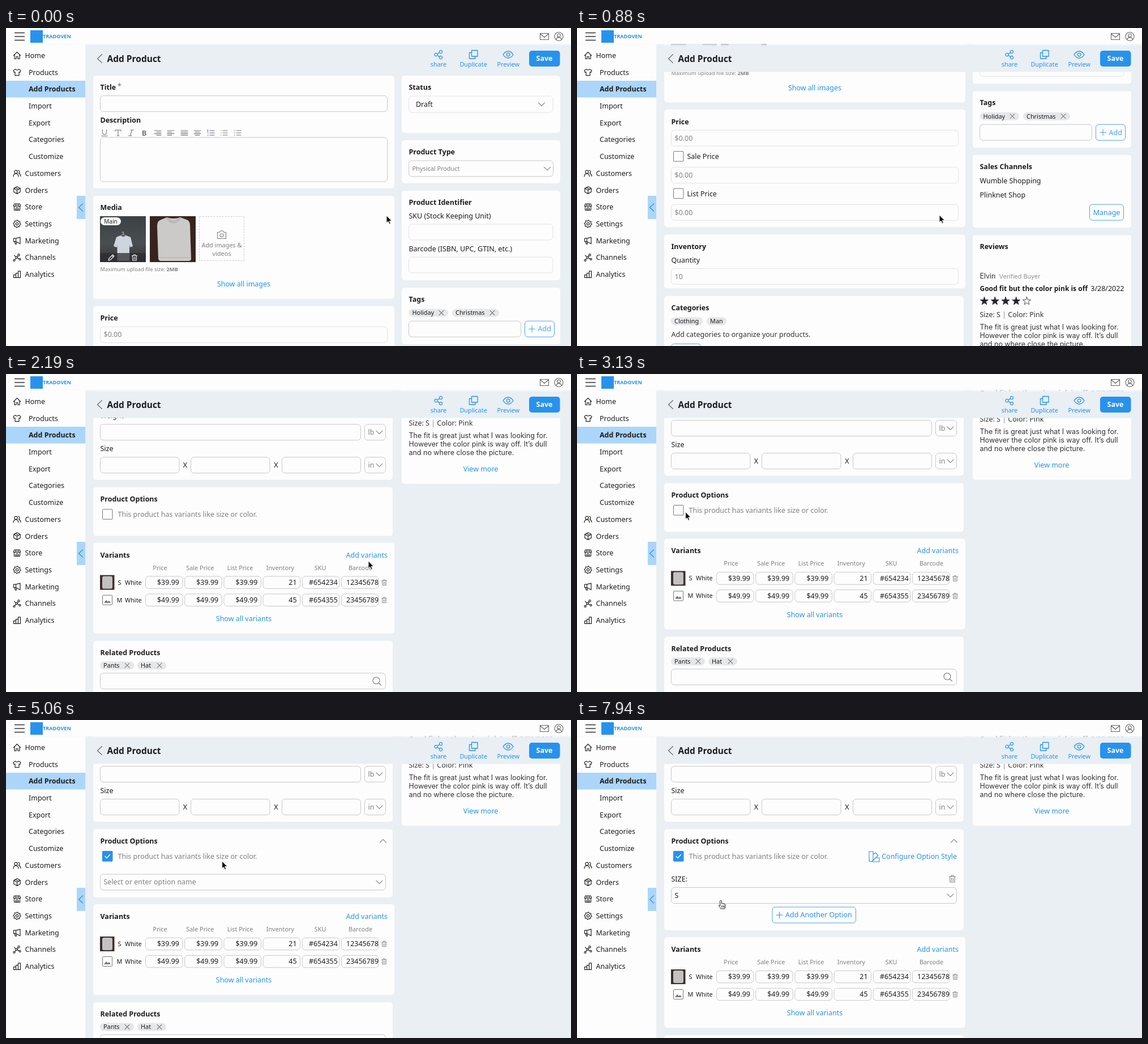
Animation, 998 px wide and 561 px high, one loop 8000 ms. Source, as an HTML page:

```html
<!DOCTYPE html>
<html lang="en">
<head>
<meta charset="utf-8">
<title>Add Product</title>
<style>
html, body { margin: 0; width: 100%; height: 100%; overflow: hidden; background: #e9eff3; }
svg { display: block; width: 100%; height: 100%; font-family: "Noto Sans", sans-serif; }
</style>
</head>
<body>
<svg id="stage" viewBox="0 0 998 561"></svg>
<script>
const BLUE = '#2792ee', SKY = '#4ba4f1', INK = '#1c1c1c', GRAY = '#808080', LINE = '#c8c8cc', FAINT = '#e2e2e5';
const CARD = '#fdfdfd', BG = '#e9eff3', PALE = '#abd6fa';
const BODY = 12.47, SMALL = 10.9, TINY = 9.35;
const stage = document.getElementById('stage');

// Drawing helpers; text y is the middle of the capitals
const text = (x, y, str, { size = BODY, fill = INK, bold, anchor = 'start', font } = {}) =>
  `<text x="${x}" y="${y + size * 0.36}" font-size="${size}" fill="${fill}" text-anchor="${anchor}"` +
  `${bold ? ' font-weight="600"' : ''}${font ? ` font-family="${font}"` : ''}>${str}</text>`;
const bold = (x, y, str) => text(x, y, str, { bold: true });
const link = (x, y, str, anchor = 'middle', fill = BLUE) => text(x, y, str, { fill, anchor });
const rect = (x, y, w, h, fill, r = 0, stroke = 'none') =>
  `<rect x="${x}" y="${y}" width="${w}" height="${h}" rx="${r}" fill="${fill}" stroke="${stroke}"/>`;
const path = (x, y, d, stroke = GRAY, width = 1.1, fill = 'none') =>
  `<path transform="translate(${x} ${y})" d="${d}" stroke="${stroke}" stroke-width="${width}" fill="${fill}" stroke-linecap="round" stroke-linejoin="round"/>`;
const group = (dy, body, id = '') => `<g ${id && `id="${id}"`} transform="translate(0 ${dy})">${body}</g>`;
const ring = (r, x = 0, y = 0) => `M${x - r} ${y}a${r} ${r} 0 1 0 ${2 * r} 0a${r} ${r} 0 1 0 ${-2 * r} 0`;

const card = (y1, y2, right = 686) => rect(154, y1, right - 154, y2 - y1, CARD, 5);
const sideCard = (y1, y2) => rect(699, y1, 280, y2 - y1, CARD, 5);
const field = (x1, x2, y, h = 28, stroke = LINE) => rect(x1 + .5, y - h / 2, x2 - x1 - 1, h, CARD, 5.5, stroke);
const down = (x, y) => path(x, y, 'M-5.5 -2.7L0 2.8L5.5 -2.7');
const cross = (x, y) => path(x, y, 'M-4 -4L4 4M4 -4L-4 4');
const search = (x, y) => path(x, y, ring(6, -1, -1) + 'M3.5 3.5L7.5 7.5', GRAY, 1.2);
const trash = (x, y, k = 1, color = GRAY) =>
  `<g transform="translate(${x} ${y}) scale(${k})">${path(0, 0, 'M-5.5 -3.8H5.5M-2 -4V-6H2V-4M-4.3 -3.5L-4 6H4L4.3 -3.5M-1.4 -1V3.8M1.4 -1V3.8', color)}</g>`;
const chip = (x, w, y, str, closable) =>
  rect(x, y - 7, w, 14, '#e6e7e9', 7) + text(x + 6, y, str, { size: SMALL }) + (closable ? cross(x + w - 12, y) : '');
const outline = (x, y, w) => rect(x + .5, y - 14, w - 1, 28, CARD, 5, SKY);
const plus = (x, y, color) => path(x, y, 'M-5.5 0H5.5M0 -5.5V5.5', color);
const addButton = (x, y) => outline(x, y, 53) + plus(x + 13, y, SKY) + link(x + 23.5, y, 'Add', 'start', SKY);
const checkbox = y => rect(170.5, y - 9, 17.5, 17.5, CARD, 1, '#777');
const money = (y, str = '$0.00') => field(166, 674, y, 28, FAINT) + text(172.5, y, str, { fill: GRAY });

const star = (x, y, solid) => {
  let d = '';
  for (let i = 0; i < 10; i++) {
    const r = i % 2 ? 3 : 7.4, a = (i / 5 - .5) * Math.PI;
    d += (i ? 'L' : 'M') + (r * Math.cos(a)).toFixed(2) + ' ' + (r * Math.sin(a)).toFixed(2);
  }
  return path(x, y, d + 'Z', '#25252d', .8, solid ? '#25252d' : 'none');
};
const gear = () => {
  let d = ring(2.2);
  for (let i = 0; i <= 32; i++) {
    const r = i % 4 < 2 ? 6.4 : 5.1, a = i * Math.PI / 16;
    d += (i ? 'L' : 'M') + (r * Math.cos(a)).toFixed(2) + ' ' + (r * Math.sin(a)).toFixed(2);
  }
  return d;
};

const icons = {
  Home: 'M-6 0L0 -6L6 0M-4.5 -1V6H-1.5V2H1.5V6H4.5V-1',
  Products: 'M-3 -5.5L-6.5 -3.5L-5.5 0L-3.5 -.5V5.5H3.5V-.5L5.5 0L6.5 -3.5L3 -5.5Q0 -2.5 -3 -5.5',
  Customers: ring(2.7, -2, -2.6) + 'M-6.5 5.5Q-6 .5 -2 .5Q2 .5 2.5 5.5M2 -5.4a2.7 2.7 0 0 1 1 5.1Q6 1 6.5 5',
  Orders: 'M0 -6.3L5.7 -3.2V3.2L0 6.3L-5.7 3.2V-3.2ZM-5.7 -3.2L0 0L5.7 -3.2M0 0V6M-2.8 -4.7L2.8 -1.6',
  Store: 'M-5 -5.5H5L6 -1.5H-6ZM-5 -1V5.5H5V-1M-2 1.5H2V5H-2ZM-2 -5V-2M2 -5V-2',
  Settings: gear(),
  Marketing: 'M-6 -4V1.5H-2L5.5 5.5V-6L-2 -4ZM-2 -4V1.5M-4.5 1.5L-3.2 6H-1L-2 1.5',
  Channels: ring(1.7, -1, 0) + ring(1.7, 3, -4.5) + ring(1.5, 5, 3) + ring(1.5, -5, 5) + 'M0 -1.4L2 -3.2M.6 .6L3.6 2.4M-2 1.3L-4 4M-5 -4L-2.3 -1',
  Analytics: 'M-6 5.7V1H-2V5.7ZM-2 5.7V-2H2V5.7ZM2 5.7V-5.7H6V5.7Z',
};
const menu = ['Home', 'Products', 'Add Products', 'Import', 'Export', 'Categories', 'Customize',
  'Customers', 'Orders', 'Store', 'Settings', 'Marketing', 'Channels', 'Analytics'];

const sidebar = () => rect(0, 31, 140, 530, CARD) + rect(0, 93, 140, 29.5, PALE) +
  menu.map((name, i) => {
    const y = 48.5 + 29.7 * i;
    return (icons[name] ? path(19.5, y, icons[name], '#222', 1.2) : '') +
      text(i && i < 7 ? 40 : 33.5, y, name, { bold: i === 2 });
  }).join('') +
  rect(125, 296, 15, 41, PALE) + path(132, 316.5, 'M3.5 -6.5L-3.5 0L3.5 6.5', BLUE, 1.2);

// A pale veil leaves only a trace of the page between bar and header
const topBar = () => rect(0, 0, 998, 28.5, CARD) + rect(0, 28.5, 141, 2.5, CARD) +
  rect(140, 28.5, 858, 2.5, 'rgba(241,244,249,.85)') +
  path(24, 15, 'M-8.5 -6.5H8.5M-8.5 0H8.5M-8.5 6.5H8.5', '#333', 1.4) +
  rect(43, 4, 22, 22, BLUE) +
  text(65, 15, 'TRADOVEN', { size: 9.1, fill: BLUE, bold: true }) +
  path(951, 15, 'M-7.5 -5.5H7.5V5.5H-7.5ZM-7.5 -5L0 1.5L7.5 -5', '#666') +
  path(976.5, 15, ring(7.5) + ring(2.8, 0, -2) + 'M-4.8 5.5Q-4 1.6 0 1.6Q4 1.6 4.8 5.5', '#666');

const header = () => rect(140, 31, 858, 46.5, BG) +
  path(165.5, 54, 'M4 -7.5L-4 0L4 7.5', '#666') +
  text(178.5, 54, 'Add Product', { size: 15.5, bold: true }) +
  path(764, 47, ring(2.6, -4.5, 0) + ring(2.6, 4, -5) + ring(2.6, 4, 5) + 'M-2.2 -1.3L1.8 -3.6M-2.2 1.3L1.8 3.6', BLUE, 1.3) +
  path(826, 47, 'M-3.5 -7.5H7V3H-3.5ZM-3.5 -3.5H-7.5V7H3V3', BLUE, 1.3) +
  path(887, 47, 'M-9 0Q-5 -6 0 -6Q5 -6 9 0Q5 6 0 6Q-5 6 -9 0Z' + ring(2.8), BLUE, 1.3) +
  ['share', 'Duplicate', 'Preview'].map((s, i) =>
    text(764 + 61.6 * i, 64, s, { size: SMALL, fill: BLUE, anchor: 'middle' })).join('') +
  rect(924, 40, 54.5, 28, BLUE, 5) +
  text(951, 54, 'Save', { fill: '#fff', bold: true, anchor: 'middle' });

const toolbar = () => {
  const tool = (x, d, color = '#777') => path(x, 185, d, color);
  const list = 'M-2 -4H6M-2 0H6M-2 4H6';
  return tool(174, 'M-3.5 -5.5V-.5Q-3.5 3 0 3Q3.5 3 3.5 -.5V-5.5M-5 5.5H5') +
    tool(198, 'M-5 -3V-5H5V-3M0 -5V5M-2 5H2') +
    tool(221, 'M-1 -5H4.5M1.7 -5L-1.7 5M-4.5 5H1') +
    text(244, 185, 'B', { size: 13, fill: '#777', bold: true, anchor: 'middle' }) +
    tool(268, 'M-6 -4H6M-2 -1.3H6M-6 1.4H6M-2 4.1H6') +
    tool(291, 'M-6 -4H6M-6 -1.3H2M-6 1.4H6M-6 4.1H2') +
    tool(315, 'M-6 -4H6M-6 -1.3H6M-6 1.4H6M-6 4.1H6') +
    tool(338, 'M-6 -4H6M-4 -1.3H4M-6 1.4H6M-4 4.1H4') +
    tool(362, list + 'M-5.5 -5.5V-2.5M-6 0H-4.8M-6 4H-4.8', '#5a5f88') +
    tool(385, list + 'M-5.5 -4h.3M-5.5 0h.3M-5.5 4h.3') +
    tool(409, list + 'M-6 -4h1M-6 0h1M-6 4h1');
};

const photos = () => rect(166, 332, 81, 81, 'url(#slate)') +
  path(207, 367, 'M0 -3q2.5 -3 0 -4.5q-2 0 -2 2M0 -3L7 1M0 -3L-7 1', '#c9c4bc', .9) +
  path(207, 367, 'M-5 -1L-12 2L-17 18L-11 20L-10.5 15V44H11V15L12 20L17 18L13 2L5 -1Q0 3 -5 -1Z', 'none', 0, '#cfd5dc') +
  rect(166, 397, 81, 16, 'rgba(45,45,48,.75)') +
  path(186, 405, 'M-5 5L-4 1.5L2.5 -5L5 -2.5L-1.5 4ZM1 -3.5L3.5 -1', '#fff') + trash(227, 405, .85, '#fff') +
  rect(167, 334, 36, 14, '#fff', 7) + text(185, 341, 'Main', { size: 10, anchor: 'middle' }) +
  rect(254, 332, 81, 81, '#38241f') +
  path(296, 372, 'M-12 -38Q0 -34 12 -38L25 -33Q29 -30 29 -24L31 35Q31 39 26 39H-22Q-27 39 -27 34L-29 -22Q-29 -31 -24 -33Z', 'none', 0, '#cbcac8') +
  path(296, 372, 'M-13 -37Q0 -20 13 -37M-10 -37Q0 -25 10 -37', '#a5a4a3', 1.1) +
  path(296, 372, 'M-25 33H29', '#b2b0ae', 1);

const mainTop = () =>
  card(84, 283) + bold(166.5, 105, 'Title') + text(197, 103, '*', { fill: '#666' }) + field(166, 674, 133.5) +
  bold(166.5, 162.5, 'Description') + toolbar() + field(166, 674, 232, 78) +
  card(296, 478) + bold(166.5, 317, 'Media') + photos() +
  `<rect x="341.5" y="332.5" width="79" height="78" fill="none" stroke="#ccc" stroke-dasharray="3 2"/>` +
  path(381, 365, 'M-7.5 -4.5H-4L-2.5 -7H2.5L4 -4.5H7.5V6.5H-7.5Z' + ring(3, 0, .8)) +
  text(381, 383, 'Add images &amp;', { size: SMALL, fill: GRAY, anchor: 'middle' }) +
  text(381, 398, 'videos', { size: SMALL, fill: GRAY, anchor: 'middle' }) +
  text(166.5, 426, 'Maximum upload file size: <tspan font-weight="600">2MB</tspan>', { size: TINY, fill: GRAY }) +
  link(420, 452, 'Show all images') +
  card(490.5, 698) + bold(166.5, 512, 'Price') + money(541) +
  checkbox(573.5) + text(194.5, 573.5, 'Sale Price') + money(606.5) +
  checkbox(639) + text(194.5, 639, 'List Price') + money(672) +
  card(711, 806) + bold(166.5, 732, 'Inventory') + text(166.5, 756, 'Quantity') + money(785, '10');

const mainMiddle = () =>
  card(120.5, 246, 683) + bold(166.5, 141, 'Categories') + chip(166, 56, 165, 'Clothing') + chip(229, 35, 165, 'Man') +
  text(166.5, 188.5, 'Add categories to organize your products.', { fill: '#333' }) + addButton(166, 219) +
  card(258, 395, 683) + bold(166.5, 279, 'Tags') + chip(166, 69.5, 303, 'Holiday', 1) + chip(243, 83, 303, 'Christmas', 1) +
  field(166, 671, 332, 28, FAINT) + search(655, 332) + field(166, 611, 368) + addButton(618, 368) +
  card(407.5, 565, 683) + bold(166.5, 428.5, 'Shipping') + text(166.5, 452, 'Weight') +
  field(166, 627, 481) + field(633, 671, 481) + text(639.5, 481, 'lb', { fill: GRAY }) + down(659.5, 481) +
  text(166.5, 510, 'Size') + field(166, 306.5, 539) + field(326, 466.5, 539) + field(487, 627, 539) +
  text(316.5, 539, 'X', { anchor: 'middle' }) + text(477, 539, 'X', { anchor: 'middle' }) +
  field(633, 671, 539) + text(639.5, 539, 'in', { fill: GRAY }) + down(659.5, 539);

const options = () =>
  `<rect id="optionCard" x="154" y="192.5" width="529" height="86" rx="5" fill="${CARD}"/>` +
  bold(166.5, 213.5, 'Product Options') + checkbox(240.5) +
  text(197.5, 240.5, 'This product has variants like size or color.', { fill: GRAY }) +
  group(0, rect(170, 231.5, 18, 18, BLUE, 1) + path(179, 240.5, 'M-4 0L-1 3L4.5 -3', '#fff', 1.4) +
    path(666, 213.5, 'M-5.5 2.7L0 -2.8L5.5 2.7'), 'checked') +
  group(0, field(166, 671, 286) + text(172.5, 286, 'Select or enter option name', { fill: GRAY }) + down(659.5, 286), 'picker') +
  group(0, `<g filter="url(#drop)">${rect(166, 300.5, 505, 59.5, CARD)}</g>` +
    text(172.5, 315.5, 'Size') + text(172.5, 345, 'Color'), 'list') +
  group(0, path(525, 241, 'M-9 8V-9H-2V5.5Q-3 9 -6 9Q-9 9 -9 5ZM-2 -4L2 -7L7 -2L-3.5 8M3 2H9V9H-5', BLUE) +
    link(671, 241, 'Configure Option Style', 'end') + text(166.5, 281, 'SIZE:') + trash(663, 280) +
    field(166, 671, 309.5) + text(172.5, 309.5, 'S') + down(659.5, 309.5) +
    outline(344.5, 344, 148.5) + plus(357.5, 344, BLUE) +
    link(368, 344, 'Add Another Option', 'start'), 'chosen');

const columns = ['Price', 'Sale Price', 'List Price', 'Inventory', 'SKU', 'Barcode'];
const variant = (y, size, cells) => text(200.5, y, size, { size: SMALL, anchor: 'middle' }) +
  text(210, y, 'White', { size: SMALL }) + trash(668, y, .8) +
  cells.map((c, i) => {
    const x = 246 + 69.2 * i;
    return field(x, x + 66.5, y, 21.5) +
      (i < 5 ? text(x + (i < 4 ? 60 : 63), y, c, { anchor: 'end' }) : text(x + 9, y, c));
  }).join('');

const mainEnd = () =>
  card(298, 458) + bold(166.5, 319.5, 'Variants') + link(674, 319.5, 'Add variants', 'end') +
  columns.map((c, i) => text(272 + 70.8 * i, 342, c, { size: SMALL, fill: GRAY, anchor: 'middle' })).join('') +
  rect(166, 355, 25.5, 26, '#3d2f2d') + rect(170, 357, 18, 22, '#c2c2c2', 3) +
  variant(368, 'S', ['$39.99', '$39.99', '$39.99', '21', '#654234', '12345678']) +
  rect(170.5, 390.5, 17, 17, CARD, 1, '#777') + path(179, 399, 'M-6 5L-2 0L1 3L3 1L6 5Z', 'none', 0, '#777') +
  variant(399, 'M', ['$49.99', '$49.99', '$49.99', '45', '#654355', '23456789']) +
  link(420, 432, 'Show all variants') +
  card(471, 573, 683) + bold(166.5, 492, 'Related Products') + chip(166, 60, 514.5, 'Pants', 1) + chip(232, 51, 514.5, 'Hat', 1) +
  field(166, 671, 542) + search(655, 542);

const sideTop = () =>
  sideCard(84, 185) + bold(711.5, 105, 'Status') + field(711, 966.5, 134.5, 29, FAINT) + text(724, 134.5, 'Draft') + down(946, 134.5) +
  sideCard(198, 274) + bold(711.5, 219, 'Product Type') + field(711, 967, 248) +
  text(717.5, 248, 'Physical Product', { size: SMALL, fill: GRAY }) + down(956, 248) +
  sideCard(287, 445) + bold(711.5, 308, 'Product Identifier') +
  text(711.5, 331.5, 'SKU (Stock Keeping Unit)') + field(711, 966.5, 360, 28, FAINT) +
  text(711.5, 389.5, 'Barcode (ISBN, UPC, GTIN, etc.)') + field(711, 966.5, 418, 28, FAINT) +
  sideCard(458, 558) + bold(711.5, 478.5, 'Tags') + chip(711.5, 69.5, 502.5, 'Holiday', 1) + chip(788, 83, 502.5, 'Christmas', 1) +
  field(711, 910, 531) + addButton(916, 531) +
  sideCard(570.5, 699) + bold(711.5, 591.5, 'Sales Channels') + text(711.5, 616.5, 'Wumble Shopping') +
  text(711.5, 641.5, 'Plinknet Shop') + outline(905, 672, 61) + link(935.5, 672, 'Manage');

const review = (y, name, title, lines) => {
  const font = 'Inter, sans-serif';
  return text(711.5, y, `${name}<tspan dx="6" font-size="${SMALL}" fill="#909094">Verified Buyer</tspan>`, { font, fill: '#333' }) +
    text(711.5, y + 22.3, title, { size: 12, bold: true }) + text(966.5, y + 22.3, '3/28/2022', { anchor: 'end' }) +
    [0, 1, 2, 3, 4].map(i => star(719.5 + 18.75 * i, y + 44.7, i < 4)).join('') +
    text(711.5, y + 68, 'Size: S <tspan fill="#888">|</tspan> Color: Pink', { fill: '#333' }) +
    lines.map((s, i) => text(711.5, y + 90 + 15 * i, s, { font, fill: '#333' })).join('');
};
const rule = y => path(711.5, y, 'M0 0H254.5', '#bbb', 1);
const reviews = () => {
  const dull = ['The fit is great just what I was looking for.', 'However the color pink is way off. It’s dull', 'and no where close the picture.'];
  const off = 'Good fit but the color pink is off';
  return sideCard(13, 572) + bold(711.5, 33, 'Reviews') +
    review(85, 'Elvin', off, dull) + rule(219) +
    review(233.2, 'Marla', 'Cute but tight', ['I’m about 145lbs, ordered a White in Large.',
      'I knew this wasn’t a loose fit shirt but I', 'wasn’t expecting a tight fit either not when', 'I ordered a large.&#160; I’m normally a Med but...']) + rule(382.5) +
    review(396.8, 'Nora', off, dull) + link(838.5, 546, 'View more');
};

const pointers = () => `<g id="cursor">` +
  group(0, path(0, 0, 'M0 0V13L3 10.3L5 15L7.3 14L5.3 9.5H9.3Z', '#fff', 1, '#111'), 'arrow') +
  group(0, path(0, 0, 'M-1.3 1Q0 -.7 1.3 1V6Q2.6 4.8 3.8 6.2Q5 5.3 6 6.7Q7.5 6.2 8 8V11Q8 13 6.8 15H0Q-1 12.5 -3.5 9.8Q-4 8 -1.3 9.2ZM1.8 9.5V12.5M4 9.5V12.5M6 9.5V12.5', '#222', 1, '#fff'), 'hand') + `</g>`;

stage.innerHTML = `<defs>
  <linearGradient id="slate" x2="0" y2="1"><stop stop-color="#3b4144"/><stop offset=".6" stop-color="#4a4e50"/><stop offset="1" stop-color="#343436"/></linearGradient>
  <clipPath id="view"><path d="M140 28H998V31H140ZM140 77H998V561H140Z"/></clipPath>
  <filter id="drop" x="-5%" y="-20%" width="110%" height="150%"><feDropShadow dx="0" dy="2" stdDeviation="2" flood-opacity=".3"/></filter>
</defs>` + rect(0, 0, 998, 561, BG) +
  `<g clip-path="url(#view)">${group(0, mainTop() + sideTop() + group(699, mainMiddle() + reviews()) +
    group(1077, mainEnd(), 'tail') + group(1084.5, options()), 'page')}</g>` +
  header() + topBar() + sidebar() + pointers();

const LOOP = 8000, CHECK = 3420, OPEN = 5850, PICK = 6750;
const el = id => document.getElementById(id);
const show = (id, on) => { el(id).style.display = on ? '' : 'none'; };
const move = (id, x, y) => el(id).setAttribute('transform', `translate(${x.toFixed(2)} ${y.toFixed(2)})`);

// Distance gained at unit speed when speeding up evenly between a and b
const ramp = (t, a, b) => t < a ? 0 : t < b ? (t - a) ** 2 / (2 * (b - a)) : t - (a + b) / 2;
const scrollAt = t => .569 * (ramp(t, 43, 500) - ramp(t, 2102, 2253));

const stops = [[0, 672, 331], [350, 640, 330], [2500, 640, 330], [3200, 179, 241], [3600, 179, 241],
  [4130, 386, 248], [5000, 386, 248], [5600, 230, 286], [5880, 230, 286], [6190, 196, 320], [6850, 196, 320], [7350, 254, 318], [LOOP, 254, 318]];
const pointerAt = t => {
  const i = stops.findIndex(s => s[0] > t), [t0, x0, y0] = stops[i - 1], [t1, x1, y1] = stops[i];
  const p = (t - t0) / (t1 - t0), k = p * p * (3 - 2 * p);
  return [x0 + (x1 - x0) * k, y0 + (y1 - y0) * k];
};

function draw(t) {
  const s = scrollAt(t), picked = t >= PICK, open = t >= OPEN && !picked, checked = t >= CHECK;
  const grow = picked ? 92.5 : open ? 94 : checked ? 34.5 : 0;
  move('page', 0, -s);
  move('tail', 0, 1077 + grow);
  el('optionCard').setAttribute('height', 86 + grow);
  show('checked', checked);
  show('picker', checked && !picked);
  show('list', open);
  show('chosen', picked);
  const hand = (s > 686 && s < 716) || (t > 3150 && t < 3700) || t > 5500;
  show('hand', hand);
  show('arrow', !hand);
  move('cursor', ...pointerAt(t));
}
function tick(now) {
  draw(now % LOOP);
  requestAnimationFrame(tick);
}
draw(0);
requestAnimationFrame(tick);
</script>
</body>
</html>
```
